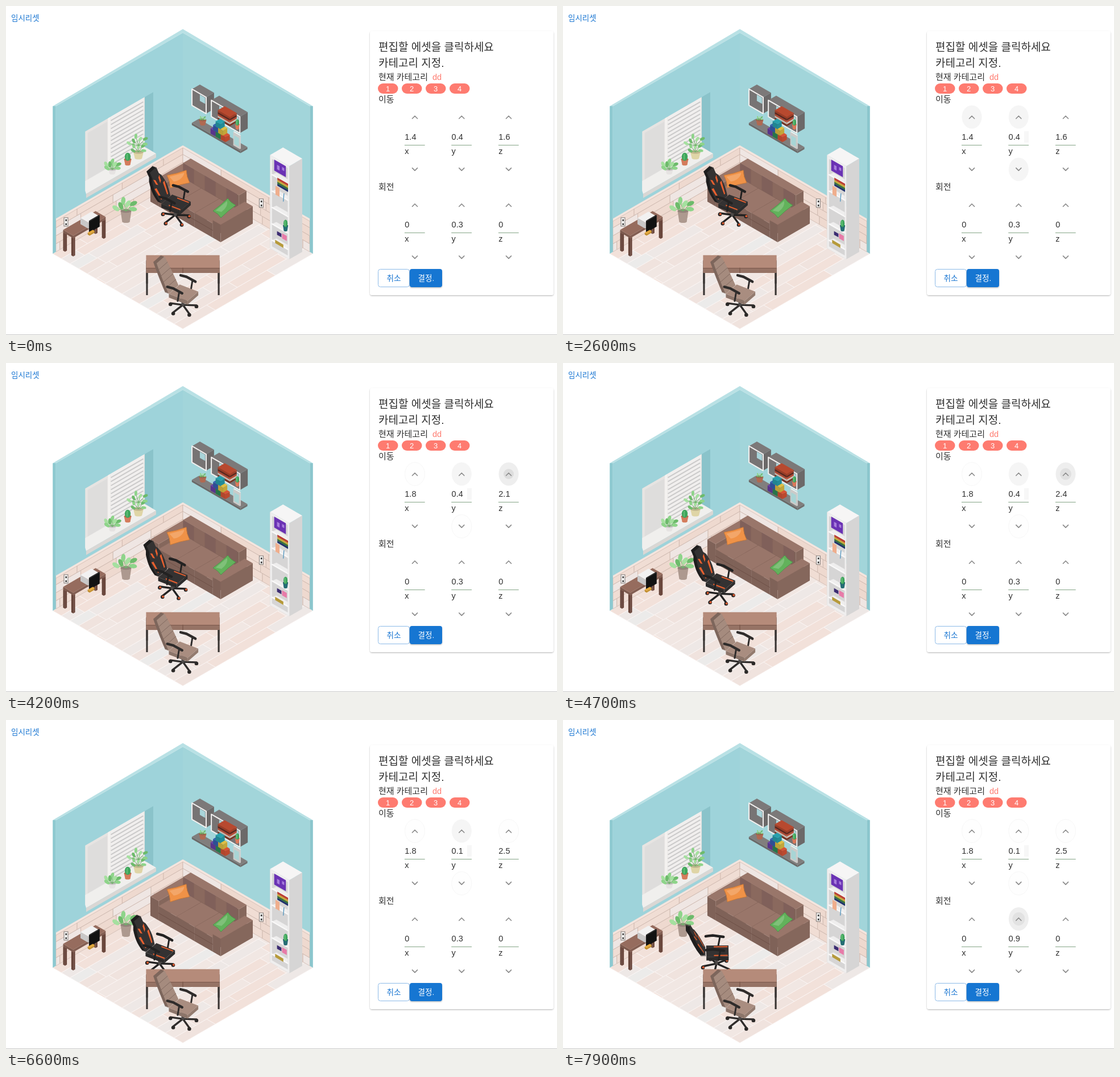
These frames come from a looping animation (969 by 578 pixels, 8 s). An HTML page:

```html
<!DOCTYPE html>
<html lang="ko">
<head>
<meta charset="utf-8">
<title>Room editor</title>
<style>
html, body { margin: 0; width: 100%; height: 100%; overflow: hidden; background: #fff; }
svg { display: block; width: 969px; height: 578px; }
text { font-family: "Liberation Sans", "Noto Sans CJK KR", "Noto Sans CJK", sans-serif; }
</style>
</head>
<body>
<svg id="stage" viewBox="0 0 969 578" xmlns="http://www.w3.org/2000/svg">
<defs>
<filter id="soft" x="-10%" y="-10%" width="120%" height="125%">
<feDropShadow dx="0" dy="1.2" stdDeviation="1.1" flood-color="#000" flood-opacity=".28"/>
</filter>
</defs>
</svg>
<script>
const NS = "http://www.w3.org/2000/svg";
const stage = document.getElementById("stage");
const LOOP = 8000;
let layer = stage;

function add(tag, attrs, words) {
  const el = document.createElementNS(NS, tag);
  for (const k in attrs) el.setAttribute(k, attrs[k]);
  if (words !== undefined) el.textContent = words;
  return layer.appendChild(el);
}
const oval = (fill, cx, cy, rx, ry, turn = 0) => add("ellipse", {
  fill, cx, cy, rx, ry, transform: `rotate(${turn} ${cx} ${cy})` });
const box = (fill, x, y, width, height, rx = 0) => add("rect", { fill, x, y, width, height, rx });
const label = (s, x, y, size, fill = "#303030", anchor = "start") => add("text", {
  x, y, "font-size": size, fill, "text-anchor": anchor }, s);
const stroke = (color, width, points) => add("polyline", {
  points: points.join(" "), stroke: color, "stroke-width": width, fill: "none",
  "stroke-linecap": "round", "stroke-linejoin": "round" });

let seed = 11;
const rand = () => (seed = (seed * 16807) % 2147483647) / 2147483647;
const pick = list => list[Math.floor(rand() * list.length)];

// Isometric room: x runs right-down, z left-down, y up, from the back corner.
const iso = ([x, y, z]) => [311 + (x - z) * 55.4, 303 + (x + z) * 32 - y * 64];
const face = (fill, pts) => add("polygon", { fill, points: pts.map(iso).join(" ") });
const edge = (color, width, pts) => stroke(color, width, pts.map(iso));
const onLeft = (fill, z0, z1, y0, y1, x = 0) => face(fill, [[x, y0, z0], [x, y0, z1], [x, y1, z1], [x, y1, z0]]);
const onRight = (fill, x0, x1, y0, y1, z = 0) => face(fill, [[x0, y0, z], [x1, y0, z], [x1, y1, z], [x0, y1, z]]);

function shade(hex, k) {
  const n = parseInt(hex.slice(1), 16);
  return `rgb(${[n >> 16, n >> 8 & 255, n & 255].map(c => Math.round(c * k))})`;
}

// A frame maps local (forward, up, side) to the room.
const frameAt = (x, y, z, a) => (f, h, s) =>
  [x + f * Math.cos(a) + s * Math.sin(a), y + h, z - f * Math.sin(a) + s * Math.cos(a)];
const room = (x, y, z) => [x, y, z];

function block(color, [a0, a1], [b0, b1], [c0, c1], frame = room) {
  const sides = [
    [.8, [a1, b1, c0], [a0, b1, c0], [a0, b0, c0], [a1, b0, c0]],
    [.8, [a0, b1, c0], [a0, b1, c1], [a0, b0, c1], [a0, b0, c0]],
    [.83, [a0, b1, c1], [a1, b1, c1], [a1, b0, c1], [a0, b0, c1]],
    [.87, [a1, b1, c1], [a1, b1, c0], [a1, b0, c0], [a1, b0, c1]],
    [1, [a0, b1, c0], [a1, b1, c0], [a1, b1, c1], [a0, b1, c1]]
  ];
  for (const [light, ...corners] of sides) {
    const pts = corners.map(c => frame(...c));
    const [p, q, r] = pts.map(iso);
    const turn = (q[0] - p[0]) * (r[1] - q[1]) - (q[1] - p[1]) * (r[0] - q[0]);
    if (turn > 0) face(shade(color, light), pts);
  }
}

// Staggered boards; place(a, b) gives the room point for row a and length b.
function planks(place, rows, size, colors, seam) {
  for (let r = 0; r < rows; r++) {
    const a = r / rows, c = (r + 1) / rows;
    for (let b = 0, end = size * rand(); b < 1; b = end, end = Math.min(1, b + size * (.7 + rand() * .6))) {
      const p = face(pick(colors), [place(a, b), place(c, b), place(c, end), place(a, end)]);
      p.setAttribute("stroke", seam);
      p.setAttribute("stroke-width", .8);
    }
  }
}

function leaves([x, y], n, reach, size) {
  for (let i = 0; i < n; i++) {
    const a = -Math.PI * (.08 + .84 * i / (n - 1));
    const d = reach * (.8 + .35 * (i % 2));
    const px = x + Math.cos(a) * d, py = y + Math.sin(a) * d;
    stroke("#72b06c", 1, [[x, y], [px, py]]);
    oval(["#8ed48a", "#6dbb6b", "#a5e09f"][i % 3], px, py, size, size * .55, a * 57 + 20);
  }
}

function pot([x, y], w, h, color) {
  add("polygon", { fill: color, points: [[x - w, y - h], [x + w, y - h], [x + w * .7, y], [x - w * .7, y]].join(" ") });
  oval(color, x, y, w * .7, 2);
  oval(shade(color, .85), x, y - h, w, w * .35);
  return [x, y - h];
}

function cactus(at, w, h, color) {
  const [x, y] = pot(at, w, h, color);
  oval("#3fa65d", x, y - h * .5, w * .8, h * .8);
  stroke("#83d58c", 1, [[x - 1, y - h], [x - 1, y]]);
}

function pillow(color, cx, cy, ax, ay, bx, by) {
  const c = (i, j) => `${cx + ax * i + bx * j} ${cy + ay * i + by * j}`;
  add("path", { fill: color, stroke: shade(color, .82),
    d: `M${c(-1, -1)}Q${c(0, -.85)} ${c(1, -1)}Q${c(.85, 0)} ${c(1, 1)}Q${c(0, .85)} ${c(-1, 1)}Q${c(-.85, 0)} ${c(-1, -1)}` });
  add("path", { fill: "#ffffff30", d: `M${c(-.8, -.7)}L${c(.75, -.7)}Q${c(.4, .3)} ${c(-.5, .2)}Z` });
}

function drawShell() {
  const H = 4, W = 4.03, OUT = 4.13;
  onLeft("#9ed3da", 0, W, 0, H);
  onRight("#a2d5da", 0, W, 0, H);
  planks((a, b) => [a * OUT, 0, b * OUT], 15, .38, ["#f0e3de", "#eee8e6", "#f2e1da", "#ecebea", "#f1e7e3"], "#fbf7f5");
  const boards = ["#f0ddd4", "#efe6e3", "#eed9cf"];
  planks((a, b) => [0, .88 * (1 - a), W * (1 - b)], 4, .3, boards, "#cfb6ac");
  planks((a, b) => [W * (1 - b), .88 * (1 - a), 0], 4, .3, boards, "#cfb6ac");
  edge("#f4e5de", 3.5, [[0, .88, W], [0, .88, 0], [W, .88, 0]]);
  edge("#d6bdb3", .8, [[0, .84, W], [0, .84, 0], [W, .84, 0]]);
  const back = [-.05, H + .05, -.05];
  face("#b9e1e5", [[0, H, W], [0, H + .05, OUT], back, [OUT, H + .05, 0], [W, H, 0], [0, H, 0]]);
  face("#8dc9d0", [[0, 0, W], [0, H, W], [0, H + .05, OUT], [0, 0, OUT]]);
  face("#8bc6cd", [[W, 0, 0], [W, H, 0], [OUT, H + .05, 0], [OUT, 0, 0]]);
}

function drawWindow() {
  const sill = 1.21, top = 2.84;
  onLeft("#8ac3ca", .94, 1.21, sill, top);
  onLeft("#e7e4e2", 1.21, 3.1, sill, top);
  onLeft("#dedddc", 2.4, 3.02, sill, top - .08);
  onLeft("#f4f2f0", 2.3, 2.38, sill, top);
  onLeft("#f1efee", 1.24, 2.29, 1.46, top);
  for (let y = 1.52; y < 2.8; y += .11) edge("#cbcaca", 2, [[0, y, 1.27], [0, y, 2.27]]);
  face("#f0efed", [[-.27, sill, .95], [.1, sill, .95], [.1, sill, 3.17], [0, sill, 3.1], [-.27, sill, 2.83]]);
  onLeft("#dad7d4", .95, 3.17, sill - .11, sill, .1);
  leaves(pot(iso([-.05, sill, 2.19]), 7, 7, "#e6e3e2"), 7, 12, 5.5);
  cactus(iso([-.05, sill, 1.7]), 6.5, 9, "#d47c5c");
  const stem = pot(iso([-.05, sill, 1.36]), 9, 11, "#dfd5a6");
  leaves(stem, 5, 12, 4.5);
  leaves([stem[0], stem[1] - 11], 6, 15, 4.5);
}

function niche(x0, x1) {
  const y0 = 2.4, y1 = 2.85, z = .25;
  block("#7c7979", [x0, x1], [y0, y1], [0, z]);
  onRight("#777474", x0, x1, y0, y1, z);
  onRight("#a9d4d9", x0 + z, x1 - .03, y0 + z, y1 - .03, z);
  edge("#f2f0ef", 2, [[x0, y0, z], [x1, y0, z], [x1, y1, z], [x0, y1, z], [x0, y0, z]]);
}

function drawWallShelves() {
  niche(.54, .99);
  niche(1.155, 2.06);
  ["#8c3c27", "#eaded4", "#cf563c", "#6c3025", "#b8492f"].forEach((c, i) =>
    block(c, [1.38, 1.76], [2.45 + i * .05, 2.5 + i * .05], [.05, .27]));
  cactus(iso([1.93, 2.44, .2]), 4, 7, "#db795a");
  block("#817e7d", [.505, 2.05], [1.83, 1.89], [0, .22]);
  leaves(pot(iso([.73, 1.9, .1]), 6.5, 8, "#b06a52"), 5, 5, 2.2);
  const cubes = ["#6a3fa8", "#2f8d57", "#d85335", "#3560b2", "#e0bf42", "#28a0ad"];
  for (let row = 0, n = 0; row < 3; row++)
    for (let i = 0; i < 3 - row; i++, n++) {
      const x = 1.1 + .16 * (i + row / 2), y = 1.89 + .14 * row;
      block(cubes[n], [x, x + .15], [y, y + .14], [.08, .22]);
    }
  block("#f4f4f2", [1.78, 1.99], [1.89, 2.26], [.15, .18]);
  onRight("#a8d5d5", 1.81, 1.96, 1.94, 2.18, .18);
}

function drawBookcase() {
  const x0 = 3.3, x1 = 3.91, z = .53;
  block("#f6f5f5", [x0, x1], [0, 2.56], [.12, z]);
  onRight("#efeeee", x0, x1, 0, 2.56, z);
  onRight("#d6d5d5", x0 + .06, x1 - .05, .08, 2.48, z);
  for (let y = .25; y < 2.1; y += .45) {
    face("#efeeee", [[x0 + .06, y, z], [x1 - .05, y, z], [x1 - .05, y + .12, z], [x0 + .2, y + .12, z]]);
    edge("#faf9f9", 2.2, [[x0 + .06, y, z], [x1 - .05, y, z]]);
  }
  onRight("#6a32b4", 3.43, 3.8, 2.2, 2.5, z);
  onRight("#a77ddc", 3.52, 3.6, 2.28, 2.4, z);
  onRight("#a77ddc", 3.68, 3.75, 2.34, 2.42, z);
  ["#21336e", "#38723f", "#c8a83c", "#bb3f35"].forEach((c, i) =>
    onRight(c, 3.53, 3.87, 1.83 + i * .055, 1.89 + i * .055, z));
  onRight("#efae8d", 3.47, 3.6, 1.56, 1.8, z);
  edge("#4f93bd", 1.3, [[3.74, 1.72, z], [3.72, 1.5, z]]);
  cactus(iso([3.79, .74, z]), 4.5, 8, "#256d74");
  onRight("#3c2d72", 3.52, 3.66, .48, .58, z);
  onRight("#e77ba8", 3.68, 3.83, .46, .6, z);
  onRight("#b69a3a", 3.46, 3.72, .22, .31, z);
}

function drawSofa() {
  const color = "#99766a", z = [.13, 1.15], seats = 3, x0 = .38, w = 1.72 / seats;
  block(color, [.12, x0], [0, .53], z);
  block(color, [x0, 2.15], [0, .8], [.13, .37]);
  for (let i = 0; i < 5; i++)
    onRight(i % 2 ? "#8a695e" : "#80605a", x0 + i * .344, x0 + (i + 1) * .344, .4, .8, .37);
  for (let i = 0; i < seats; i++) {
    const x = [x0 + i * w, x0 + (i + 1) * w];
    block(color, x, [0, .39], [.37, z[1]]);
    edge("#7f5f55", 1, [[x[1], .39, .37], [x[1], .39, z[1]]]);
  }
  edge("#6e5047", 1, [[x0, .2, z[1]], [2.1, .2, z[1]]]);
  block(color, [2.1, 2.35], [0, .48], z);
  pillow("#f09247", 303, 304, 17, -4.5, 3, 11);
  pillow("#62b25b", 384, 355, 13, -11, 7, 6);
}

function outlet(x, y, z) {
  const [px, py] = iso([x, y, z]);
  box("#f2f0ee", px - 3.5, py - 7, 7, 15).setAttribute("stroke", "#827b78");
  for (const dy of [-4, 3]) box("#353535", px - 1, py + dy, 2.5, 3);
}

function table(color, x, z, height, thick, leg, frame) {
  for (const a of x) for (const c of z) {
    const f = a === x[0] ? a + leg / 2 : a - leg / 2, s = c === z[0] ? c + leg / 2 : c - leg / 2;
    block(leg > .05 ? shadeHex : "#45403e", [f - leg / 2, f + leg / 2], [0, height - thick], [s - leg / 2, s + leg / 2], frame);
  }
  block(color, x, [height - thick, height], z, frame);
}
const shadeHex = "#7a5145";

function drawLeftSide() {
  outlet(0, .67, 3.71);
  table("#966c5e", [.08, .4], [2.85, 3.88], .57, .07, .06);
  block("#f2f1f1", [.1, .35], [.47, .64], [3, 3.35]);
  block("#151515", [.36, .38], [.38, .69], [3.02, 3.34]);
  block("#e4a838", [.38, .44], [.35, .4], [3.24, 3.4]);
  leaves(pot(iso([.285, 0, 2.09]), 9.5, 19, "#ad998f"), 6, 16, 7);
}

function drawDesk() {
  const frame = frameAt(3.03, 0, 3.03, Math.PI / 4);
  table("#b58b7a", [-.825, .825], [-.245, .245], .75, .14, .04, frame);
  edge("#6e4c40", 1, [frame(0, .75, .245), frame(0, .61, .245)]);
  edge("#7c594c", 1, [frame(-.82, .74, .245), frame(.82, .74, .245)]);
}

const gaming = {
  seat: "#343232", back: "#343232", rim: "#1f1e1e", frame: "#232222", wheel: "#d85a30", stripe: "#e8602f",
  half: t => t > .72 ? .13 : .18 + .05 * Math.sin(Math.PI * t / .72)
};
const office = {
  seat: "#a98d80", back: "#a58b7e", rim: "#7d665c", frame: "#2f2c2b", wheel: "#2a2827", seam: "#826a60",
  half: t => .2 - .04 * t * t
};

function chair(x, y, z, turn, style) {
  const frame = frameAt(x, y, z, turn - .1);
  const back = (t, s, depth = 0) => frame(-.25 - .35 * t - depth, .4 + .68 * t, s);
  const arm = s => {
    edge(style.frame, 3, [frame(.08, .62, s), frame(.04, .36, s)]);
    edge(style.frame, 4.5, [frame(-.24, .64, s), frame(-.08, .66, s), frame(.16, .62, s)]);
  };
  for (let i = 0; i < 5; i++) {
    const a = i * Math.PI * .4 + .5;
    const tip = frame(.31 * Math.cos(a), .03, .31 * Math.sin(a));
    edge(style.frame, 3.4, [frame(0, .08, 0), tip]);
    const [px, py] = iso(tip);
    oval(style.frame, px, py + 2, 3.3, 3.2);
    oval(style.wheel, px + .8, py + 1.5, 2, 2);
  }
  edge("#4d4948", 5, [frame(0, .08, 0), frame(0, .33, 0)]);

  const steps = [...Array(11).keys()].map(i => i / 10);
  for (const depth of [.09, .06, .03, 0]) {
    const left = steps.map(t => back(t, style.half(t), depth));
    const right = steps.map(t => back(t, -style.half(t), depth)).reverse();
    face(depth ? style.rim : style.back, [...left, ...right]);
  }
  for (const side of [-1, 1]) {
    if (!style.stripe) break;
    face(style.stripe, [back(.1, side * .1), back(.1, side * .14), back(.5, side * .2), back(.48, side * .13)]);
    face(style.stripe, [back(.52, side * .04), back(.58, side * .1), back(.75, side * .12), back(.7, side * .06)]);
  }
  if (style.seam) for (const t of [.2, .4, .6, .8])
    edge(style.seam, 1, [back(t, style.half(t)), back(t, -style.half(t))]);

  arm(-.27);
  block(style.seat, [-.23, .27], [.32, .42], [-.22, .22], frame);
  if (style.stripe) for (const s of [-.17, .17])
    edge(style.stripe, 2, [frame(-.05, .42, s), frame(.24, .42, s)]);
  arm(.27);
}

const columns = [719, 801.3, 884], ROWGAP = 154.5;

function makeHalo(cx, cy) {
  const back = oval("none", cx, cy, 17.5, 20.5);
  const wave = oval("#000", cx, cy, 9, 9);
  return (mode, age) => {
    back.setAttribute("fill", { ring: "#fefefe", light: "#f5f5f5", active: "#eeeeee" }[mode] || "none");
    back.setAttribute("stroke", mode === "ring" ? "#f7f7f7" : "none");
    const grow = Math.min(1, age / 300);
    wave.setAttribute("rx", 9 + 6 * grow);
    wave.setAttribute("ry", 9 + 8 * grow);
    wave.setAttribute("opacity", mode === "active" ? .07 * (1 - grow) : 0);
  };
}

function drawPanel() {
  label("임시리셋", 9, 25.5, 13.5, "#1976d2");
  box("#fff", 640, 44, 323, 464, 4).setAttribute("filter", "url(#soft)");
  label("편집할 에셋을 클릭하세요", 655, 78.7, 19);
  label("카테고리 지정.", 655, 106.7, 19);
  label("현재 카테고리", 655, 130, 15);
  label("dd", 750, 130, 14.5, "#fe7b70");
  for (let i = 0; i < 4; i++) {
    box("#fe7b70", 654 + i * 42, 136, 35.5, 18, 9);
    label(i + 1, 671.7 + i * 42, 149.5, 13, "#fff", "middle");
  }
  label("이동", 655, 168.5, 15);
  label("회전", 655, 322.5, 15);
  box("none", 654.5, 462.5, 55, 31, 4).setAttribute("stroke", "#8cbae8");
  label("취소", 682, 482.5, 13.6, "#1976d2", "middle");
  box("#1976d2", 710, 462, 57, 32, 4).setAttribute("filter", "url(#soft)");
  label("결정.", 738.8, 482.5, 13.6, "#fff", "middle");
  stroke("#c9c9c9", 1, [[0, 577.5], [969, 577.5]]);
}

const chevron = (cx, cy, dir, w = 4.5, color = "#8c8c8c", width = 1.7) =>
  stroke(color, width, [[cx - w, cy + w / 2 * dir], [cx, cy - w / 2 * dir], [cx + w, cy + w / 2 * dir]]);

drawShell();
drawWindow();
drawWallShelves();
outlet(2.49, .575, 0);
drawBookcase();
drawSofa();
drawLeftSide();
const chairLayer = add("g", {});
drawDesk();
chair(3.55, 0, 3.55, .3, office);
drawPanel();

// Repeated clicks on one button: field, step, first click, count, end of the hover tint.
const PERIOD = 150;
const runs = [
  { field: 1, step: 1, from: 500, count: 5, tint: 7000 },
  { field: 1, step: -1, from: 1700, count: 5, tint: 3300 },
  { field: 0, step: 1, from: 2750, count: 4, tint: 3400 },
  { field: 2, step: 1, from: 3600, count: 9, tint: 5000 },
  { field: 1, step: -1, from: 5250, count: 3, tint: 6000 },
  { field: 4, step: 1, from: 7050, count: 6, tint: 8000 }
];
const halos = {};
for (const run of runs) {
  run.key = run.field + "/" + run.step;
  run.end = run.from + PERIOD * (run.count - 1);
  halos[run.key] = halos[run.key] || makeHalo(columns[run.field % 3],
    (run.step > 0 ? 195 : 287) + (run.field > 2 ? ROWGAP : 0));
}

const stepper = box("#f7f7f7", 811, 220, 8, 20);
const arrows = [chevron(815, 226.5, 1, 2, "#555", 1.5), chevron(815, 234.5, -1, 2, "#555", 1.5)];
const fields = [], rules = [];
for (const dy of [0, ROWGAP]) columns.forEach((cx, i) => {
  const x = cx - 17.7, y = Math.floor(dy);
  chevron(cx, 195.5 + dy, 1);
  chevron(cx, 286.8 + dy, -1);
  fields.push(label("", x, 235 + y, 14.5));
  rules.push(stroke("#84a486", 1, [[x, 244.5 + y], [x + 35, 244.5 + y]]));
  label("xyz"[i], x, 259.5 + y, 14.5);
});

let pose = "";
function drawGamingChair([x, y, z, , turn]) {
  const next = [x, y, z, turn].join();
  if (next === pose) return;
  pose = next;
  layer = chairLayer;
  layer.replaceChildren();
  chair(x - .44, y - .4, z - .4, turn, gaming);
  layer = stage;
}

function render(time) {
  const t = Math.floor(time / 100) * 100;
  const tenths = [14, 4, 16, 0, 3, 0];
  const states = {};
  for (const run of runs) {
    if (t < run.from - 250) continue;
    const done = Math.max(0, Math.min(run.count, Math.floor((t - run.from) / PERIOD) + 1));
    tenths[run.field] += run.step * done;
    const mode = t >= run.tint ? "ring" : t >= run.from && t < run.end + 300 ? "active" : "light";
    states[run.key] = [mode, t - run.from - PERIOD * (done - 1)];
  }
  for (const key in halos) halos[key](...(states[key] || ["", 999]));
  const values = tenths.map(n => n / 10);
  values.forEach((v, i) => { fields[i].textContent = v; });
  drawGamingChair(values);
  const focus = t >= 500 && t < 2400;
  rules[1].setAttribute("stroke", focus ? "#333" : "#84a486");
  stepper.setAttribute("visibility", t >= 500 ? "visible" : "hidden");
  arrows.forEach(a => a.setAttribute("visibility", focus ? "visible" : "hidden"));
}

const start = performance.now();
function tick() {
  render((performance.now() - start) % LOOP);
  requestAnimationFrame(tick);
}
tick();
</script>
</body>
</html>
```
